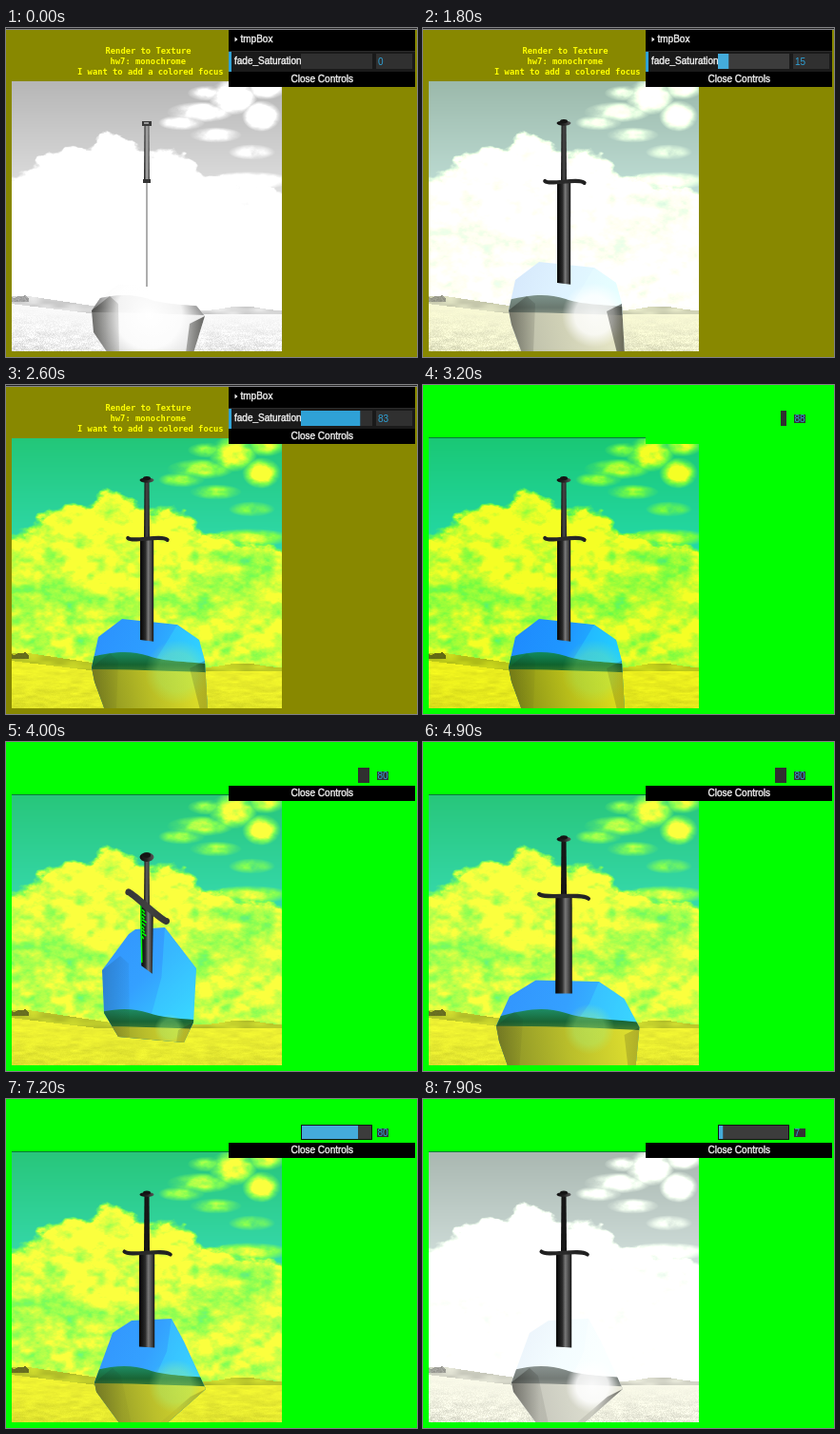
Animation of 432x346 px, one loop 8000 ms. Source, as an HTML page with a canvas:

```html
<!DOCTYPE html>
<html lang="en">
<head>
<meta charset="utf-8">
<title>Render to Texture</title>
<style>
html, body { margin: 0; width: 100%; height: 100%; overflow: hidden; background: #880; }
canvas { display: block; }
</style>
</head>
<body>
<canvas id="stage" width="432" height="346"></canvas>
<script>
const LOOP = 8000, LEFT = 6, TOP = 56, SIZE = 284, CX = 148, CY = 198;
const ctx = document.getElementById('stage').getContext('2d');

const clamp = (v, a = 0, b = 1) => Math.min(b, Math.max(a, v));
const lerp = (a, b, k) => a + (b - a) * k;
const smooth = k => k * k * (3 - 2 * k);

// Interpolates [time, ...values] rows; a value may be a list.
function track(rows, t) {
  const i = rows.findIndex(r => r[0] > t);
  if (i === 0) return rows[0].slice(1);
  if (i < 0) return rows[rows.length - 1].slice(1);
  const a = rows[i - 1], b = rows[i], k = (t - a[0]) / (b[0] - a[0]);
  return a.slice(1).map((v, j) => {
    const w = b[j + 1];
    return Array.isArray(v) ? v.map((n, m) => lerp(n, w[m], k)) : lerp(v, w, k);
  });
}

// ---- background: unclamped grey plus a colour for each pixel ----
function hash(x, y) {
  let h = Math.imul(x, 374761393) ^ Math.imul(y, 668265263);
  h = Math.imul(h ^ (h >>> 13), 1274126177);
  return ((h ^ (h >>> 16)) >>> 0) / 4294967296;
}
function noise(x, y) {
  const ix = Math.floor(x), iy = Math.floor(y), u = smooth(x - ix), v = smooth(y - iy);
  return lerp(lerp(hash(ix, iy), hash(ix + 1, iy), u),
              lerp(hash(ix, iy + 1), hash(ix + 1, iy + 1), u), v);
}
// Fractal noise centred on zero.
function fbm(x, y) {
  let sum = -0.47, amp = 0.5;
  for (let i = 0; i < 4; i++, x *= 2, y *= 2, amp /= 2) sum += amp * noise(x + i * 17, y + i * 9);
  return sum;
}

const LIME = [95, 250, 38], CLOUD = [236, 246, 0];
const FIELD = [236, 240, 0], HILL = [165, 180, 0], TREE = [90, 98, 0];
const cloudTop = [[6, 164], [30, 147], [62, 126], [84, 132], [106, 114], [135, 130],
                  [160, 127], [185, 136], [205, 155], [230, 163], [290, 176]];
// x, y, radii, strength
const puffs = [[238, 72, 19, 14, 1], [268, 92, 15, 12, 1], [204, 88, 26, 8, 0.6], [184, 99, 18, 6, 0.5],
               [212, 68, 16, 6, 0.5], [272, 64, 16, 8, 0.6], [220, 112, 20, 6, 0.5],
               [258, 130, 18, 6, 0.45], [255, 160, 34, 7, 0.7]];

const bump = (x, y, cx, cy, rx, ry) => Math.exp(-(((x - cx) / rx) ** 2) - ((y - cy) / ry) ** 2);

function cloudDensity(x, y) {
  const n = fbm(x / 26, y / 15), wisp = fbm(x / 11 + 40, y / 8);
  const below = y - track(cloudTop, x)[0] + n * 24 + wisp * 12;
  const body = clamp(below / 9 + 0.5) * (0.72 + 0.22 * bump(x, y, 130, 165, 85, 34)
    - 0.16 * bump(x, y, 20, 230, 60, 30) - 0.2 * bump(x, y, 270, 188, 45, 14));
  let puff = 0;
  for (const [px, py, rx, ry, power] of puffs) {
    puff = Math.max(puff, power * clamp(1.5 - 1.1 * Math.hypot((x - px) / rx, (y - py) / ry)));
  }
  const cover = Math.max(body, puff);
  return clamp(cover + (n * 0.6 + wisp * 0.7) * Math.min(1, cover * 2));
}

function scenery(x, y) {
  const hillTop = Math.min(296, 281 + Math.max(0, x - 20) * 0.15,
                           297 - 5 * Math.exp(-(((x - 248) / 26) ** 2)));
  const fieldTop = Math.min(300, 289 + x * 0.12);
  const grain = hash(x, y) - 0.5;
  if (x < 24 && y < 288 && y > 278 + 6 * noise(x / 4, 3)) return [165 + grain * 30, TREE];
  if (y > fieldTop) {
    const tuft = fbm(x / 12, y / 3), deep = (y - fieldTop) / 40;
    return [250 + tuft * 55 * deep + grain * 35 * deep - deep * 14,
            FIELD.map(c => c && c + tuft * 45 - deep * 12)];
  }
  if (y > hillTop) {
    const n = noise(x / 14, y / 4) * 40;
    return [196 + n, HILL.map(c => c && c + n)];
  }
  const d = cloudDensity(x, y), down = y - TOP;
  const sky = [4 + down * 0.06, 202 + down * 0.12, 108 + down * 0.45];
  if (d < 0.45) {
    const k = d / 0.45;
    return [lerp(182 + down * 0.35, 268, k), sky.map((c, i) => lerp(c, LIME[i], k))];
  }
  const k = clamp((d - 0.45) / 0.4);
  return [lerp(268, 310, k), LIME.map((c, i) => lerp(c, CLOUD[i], k))];
}

const base = new Float32Array(SIZE * SIZE * 4);
for (let i = 0; i < SIZE * SIZE; i++) {
  const [grey, rgb] = scenery(LEFT + i % SIZE, TOP + Math.floor(i / SIZE));
  base.set([grey, ...rgb], i * 4);
}
const layer = document.createElement('canvas');
layer.width = layer.height = SIZE;
const layerCtx = layer.getContext('2d');
const pixels = layerCtx.createImageData(SIZE, SIZE);
let sat = 0, painted = -1;

function drawBackdrop() {
  if (painted !== sat) {
    for (let i = 0; i < base.length; i += 4) {
      const grey = base[i] * (1 - sat);
      for (let c = 0; c < 3; c++) pixels.data[i + c] = grey + base[i + 1 + c] * sat;
      pixels.data[i + 3] = 255;
    }
    layerCtx.putImageData(pixels, 0, 0);
    painted = sat;
  }
  ctx.drawImage(layer, LEFT, TOP);
}

function tone(grey, rgb, alpha = 1) {
  const c = rgb.map(v => Math.round(clamp(lerp(grey, v, sat), 0, 255)));
  return `rgba(${c},${alpha})`;
}

// ---- drawing helpers ----
function rect(x, y, w, h, fill) {
  ctx.fillStyle = fill;
  ctx.fillRect(x, y, w, h);
}
function poly(points, fill) {
  ctx.beginPath();
  for (const [x, y] of points) ctx.lineTo(x, y);
  ctx.closePath();
  ctx.fillStyle = fill;
  ctx.fill();
}
function text(str, x, y, font, fill) {
  ctx.font = font;
  ctx.fillStyle = fill;
  ctx.fillText(str, x, y);
}
function ramp(x0, y0, x1, y1, ...colors) {
  const g = ctx.createLinearGradient(x0, y0, x1, y1);
  colors.forEach((c, i) => g.addColorStop(i / (colors.length - 1), c));
  return g;
}

// ---- rock outlines, clockwise from the left corner ----
const rocks = {
  edge:  [90, 297, 99, 284, 118, 270, 175, 270, 196, 287, 209, 303, 197, 342, 107, 342, 92, 320],
  front: [90, 297, 97, 265, 122, 246, 180, 252, 203, 268, 209, 290, 212, 342, 104, 342, 93, 312],
  above: [101, 240, 129, 202, 136, 197, 167, 195, 200, 238, 197, 295, 187, 316, 118, 310, 103, 285],
  wide:  [64, 300, 85, 270, 115, 255, 190, 252, 220, 272, 246, 310, 235, 342, 75, 342, 67, 318],
  turn:  [95, 290, 100, 265, 121, 241, 163, 228, 189, 248, 206, 293, 180, 342, 118, 342, 91, 319],
  rest:  [93, 298, 112, 246, 132, 233, 174, 231, 187, 255, 210, 305, 168, 342, 120, 342, 95, 308]
};
// time, yaw, pitch, blade depth, glow x, glow radius, outline
const poses = [
  [500, 1.57, 0, 74, 150, 58, rocks.edge],
  [1100, 0.62, 0.02, 71, 180, 34, rocks.front],
  [3800, 0.62, 0.02, 71, 180, 34, rocks.front],
  [4000, 0.74, 0.85, 70, 172, 16, rocks.above],
  [4300, 0.5, 0.95, 72, 165, 16, rocks.above],
  [4700, 0.3, 0.15, 70, 175, 25, rocks.front],
  [5100, -0.3, -0.3, 62, 175, 28, rocks.wide],
  [5600, -0.8, 0, 64, 176, 26, rocks.rest],
  [6000, -0.42, 0, 65, 178, 24, rocks.turn],
  [6700, 0.36, 0, 63, 178, 28, rocks.rest]
];

function drawRock(flat, glowX, glowR) {
  const p = [];
  for (let i = 0; i < flat.length; i += 2) p.push([flat[i], flat[i + 1]]);
  const [l, ul, tl, tr, ur, r, br, bl, ll] = p;
  const top = Math.min(tl[1], tr[1]);
  const core = [lerp(l[0], r[0], 0.65), lerp(top, 300, 0.5)];

  ctx.save();
  poly(p, ramp(l[0], top, r[0], 290, tone(250, [0, 122, 255]), tone(262, [0, 135, 255]),
               tone(268, [0, 190, 255])));
  ctx.clip();
  poly([tr, ur, r, [core[0] + 14, 296], [core[0] - 12, 292], core], tone(275, [10, 225, 255], 0.3));

  // reflected hills and field
  ctx.beginPath();
  ctx.moveTo(60, 294);
  ctx.bezierCurveTo(105, 281, 125, 277, 150, 285);
  ctx.bezierCurveTo(170, 292, 190, 290, 250, 297);
  ctx.lineTo(250, 346);
  ctx.lineTo(60, 346);
  ctx.fillStyle = ramp(0, 282, 0, 306, tone(145, [0, 135, 85]), tone(125, [0, 95, 35]),
                       tone(165, [60, 125, 20]));
  ctx.fill();
  ctx.beginPath();
  ctx.moveTo(60, 299);
  ctx.quadraticCurveTo(130, 298, 250, 304);
  ctx.lineTo(250, 346);
  ctx.lineTo(60, 346);
  ctx.fillStyle = ramp(l[0], 330, r[0], 305, tone(195, [118, 128, 0]), tone(215, [178, 184, 0]),
                       tone(235, [225, 225, 0]));
  ctx.fill();

  const glow = ctx.createRadialGradient(glowX, 302, 0, glowX, 302, glowR);
  const light = a => tone(310, [130, 235, 90], a * (1 - sat * 0.8));
  glow.addColorStop(0, light(1));
  glow.addColorStop(0.6, light(0.9));
  glow.addColorStop(1, light(0));
  rect(60, 230, 190, 112, glow);

  const dim = a => `rgba(25,25,20,${a * (1 - sat * 0.75)})`;
  poly([l, [l[0] + 19, l[1] - 15], [l[0] + 28, l[1] - 7], [bl[0] + 12, bl[1]], bl, ll],
       ramp(l[0], 0, l[0] + 30, 0, dim(0.5), dim(0.1)));
  poly([r, br, [br[0] - 8, br[1]], [r[0] - 16, r[1] + 8]],
       ramp(r[0], 0, r[0] - 32, 0, dim(0.65), dim(0.1)));
  ctx.restore();
}

function drawSword(yaw, pitch, depth, etched) {
  const cy = Math.cos(yaw), sy = Math.sin(yaw), cp = Math.cos(pitch), sp = Math.sin(pitch);
  const project = (x, y) => {
    const z = x * sy, k = 450 / (450 - y * sp - z * cp);
    return [CX + x * cy * k, CY - (y * cp - z * sp) * k];
  };
  const edgeOn = cy < 0.1;
  const side = clamp(Math.abs(sy) * 1.5 - 0.6);
  const shade = v => `rgb(${v},${v},${v})`;
  const tilt = Math.abs(sp);

  // blade
  const half = edgeOn ? 0.6 / Math.max(0.01, cy) : 8.7;
  const corners = edgeOn
    ? [[CX - 0.6, 162], [CX + 0.6, 162], [CX + 0.6, CY + depth], [CX - 0.6, CY + depth]]
    : [project(-half, 36), project(half, 36), project(half, -depth), project(-half, -depth)];
  const [a, b] = corners;
  poly(corners, edgeOn ? '#777'
    : ramp(a[0], 0, b[0], 0, '#080808', '#151515', '#2c2c2c', '#787878', '#4a4a4a', '#141414'));
  if (etched) {
    ctx.strokeStyle = '#0f0';
    ctx.lineWidth = 1.5;
    ctx.beginPath();
    ctx.moveTo(a[0] + 0.5, a[1] + 3);
    ctx.lineTo(corners[3][0] + 0.5, corners[3][1] - 3);
    for (let i = 0; i < 9; i++) {
      const y = a[1] + 8 + i * 3.5;
      ctx.moveTo(a[0] + 2, y);
      ctx.lineTo(a[0] + 3 + hash(i, 4) * 4, y + 3);
    }
    ctx.stroke();
  }

  // grip
  const [gx, gy] = project(0, 38), [px, py] = project(0, 97);
  poly([[px - 2.5, py], [px + 2.5, py], [gx + 3, gy], [gx - 3, gy]],
       ramp(px - 3, 0, px + 3, 0, shade(12), shade(25 + 175 * side), shade(18 + 50 * side)));

  // guard
  const tipL = project(-29, 36), tipR = project(29, 36);
  const bend = 5 * Math.abs(cy) * (1 - tilt);
  ctx.lineCap = 'round';
  ctx.lineWidth = 4 + 4 * tilt;
  const metal = 30 + 30 * tilt;
  ctx.strokeStyle = ramp(tipL[0], 0, tipR[0] + 1, 0, shade(metal), shade(metal + 12), shade(metal));
  if (edgeOn) {
    rect(CX - 4, 159, 8, 4, '#333');
  } else {
    ctx.beginPath();
    ctx.moveTo(tipL[0] + 3, tipL[1] - bend * 0.5);
    ctx.bezierCurveTo(tipL[0] + 10 * cy, tipL[1] + bend * 0.7,
                      tipR[0] - 12 * cy, tipR[1] - bend * 0.9, tipR[0] - 3, tipR[1] + bend * 0.5);
    ctx.stroke();
  }

  // pommel
  if (side > 0.85) {
    rect(CX - 5, 98, 10, 5, '#3a3a3a');
    rect(CX - 3, 99, 5, 2, '#999');
  } else {
    ctx.beginPath();
    ctx.ellipse(px, py - 0.5, 7.5, 2.6 + 3 * tilt, 0, 0, 7);
    ctx.fillStyle = ramp(px - 7, 0, px + 7, 0, '#111', '#222', '#555');
    ctx.fill();
    ctx.beginPath();
    ctx.ellipse(px, py - 2.5, 4, 2 + tilt, 0, 0, 7);
    ctx.fillStyle = '#141414';
    ctx.fill();
  }
}

// ---- control panel ----
const UI = '10px "Liberation Sans", Arial, sans-serif';
const MONO = 'bold 8.8px "DejaVu Sans Mono", monospace';
const BLUE = '#2fa1d6';

function label(str, x, y) {
  text(str, x, y, UI, '#eee');
  ctx.strokeStyle = '#eee';
  ctx.lineWidth = 0.4;
  ctx.strokeText(str, x, y);
}

function closeBar(hover) {
  rect(234, 46, 196, 16, hover ? '#161616' : '#000');
  label('Close Controls', 299.5, 57);
}

function drawPanel(value, hover, dragging) {
  rect(234, 2, 196, 60, '#000');
  rect(234, 24, 196, 1, '#2c2c2c');
  rect(234, 25, 196, 21, '#1a1a1a');
  rect(234, 25, 3, 21, BLUE);
  poly([[240.5, 9.5], [243.5, 12], [240.5, 14.5]], '#eee');
  label('tmpBox', 246.5, 15);
  label('fade_Saturation', 240, 38);
  rect(310, 27, 75, 16, dragging ? '#3c3c3c' : '#303030');
  rect(310, 27, value * 0.75, 16, dragging ? '#44abda' : BLUE);
  rect(389, 27, 38, 16, '#303030');
  text(value, 391, 39, UI, BLUE);
  closeBar(hover);
}

function drawGreenPanel(value, t) {
  const end = 310 + value * 0.75;
  rect(234, 46, 196, 16, '#0f0');
  if (t >= 7200) {
    rect(310, 27, 75, 16, '#111');
    rect(311, 28, 73, 14, '#3c3c3c');
    rect(311, 28, end - 311, 14, '#44abda');
  } else {
    rect(end, 27, Math.max(0, 382 - end), 16, '#303030');
  }
  rect(390, 31, 12, 9, '#333');
  text(value, 390.5, 39, UI, BLUE);
  if (t >= 3600) closeBar(t === 3600 || t === 7100);
}

const levels = [[1700, 0], [1799, 0], [1800, 15], [2600, 83], [2700, 93], [2800, 97], [2900, 97],
  [3000, 95], [3400, 80], [7300, 80], [7400, 70], [7500, 70], [7600, 52], [7700, 33],
  [7800, 18], [7900, 7]];

function draw(t) {
  const value = Math.round(track(levels, t)[0]);
  const green = t >= 3000;
  sat = value / 100;
  rect(0, 0, 432, 346, green ? '#0f0' : '#880');
  if (green) {
    rect(LEFT, TOP - 1, 228, 1, '#0a7a3a');
  } else {
    rect(0, 0, 432, 1, '#222');
    rect(0, 1, 432, 1, '#85858c');
    text('Render to Texture', 104.5, 27, MONO, '#ff0');
    text('hw7: monochrome', 109.5, 38, MONO, '#ff0');
    text('I want to add a colored focus', 75, 49, MONO, '#ff0');
  }

  const [yaw, pitch, depth, glowX, glowR, outline] = track(poses, t);
  ctx.save();
  ctx.beginPath();
  ctx.rect(LEFT, TOP, SIZE, SIZE);
  ctx.clip();
  drawBackdrop();
  drawRock(outline, glowX, glowR);
  drawSword(yaw, pitch, depth, t >= 3900 && t <= 4300);
  ctx.restore();

  if (green) drawGreenPanel(value, t);
  else drawPanel(value, t >= 1300 && t < 1600, t >= 1800 && t < 2500);
}

let start = null;
function frame(now) {
  if (start === null) start = now;
  draw(Math.floor(((now - start) % LOOP) / 100) * 100);
  requestAnimationFrame(frame);
}
draw(0);
requestAnimationFrame(frame);
</script>
</body>
</html>
```
